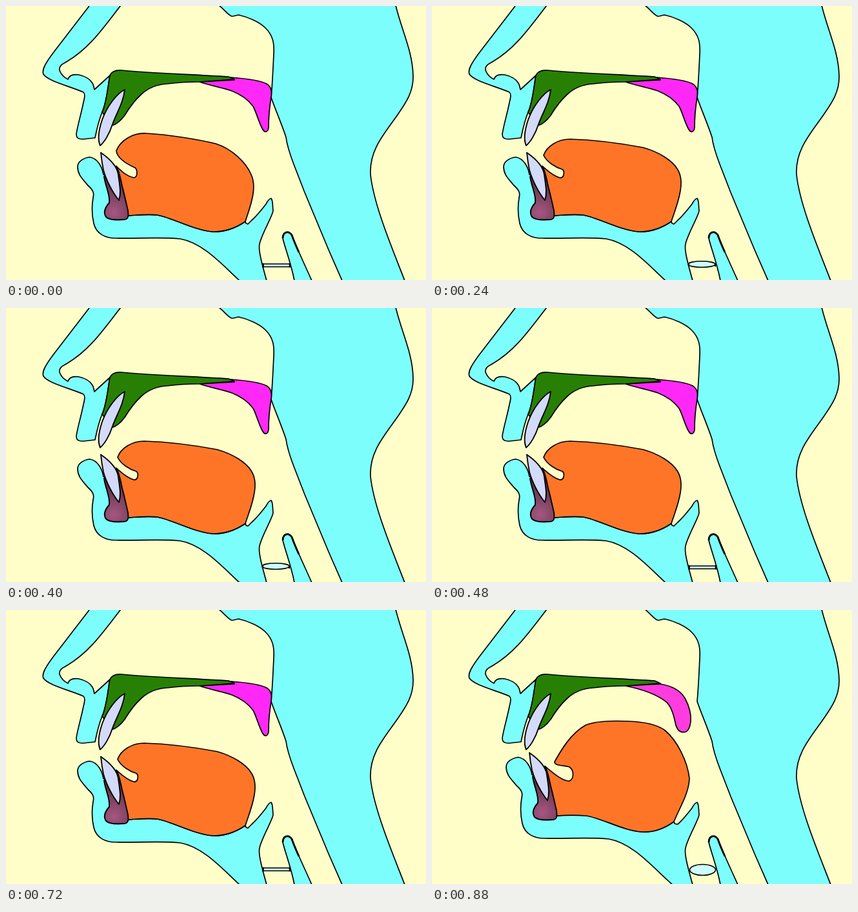
Recreate the animation shown at these times as an HTML page with a canvas. Size 651 px wide and 426 px high, loop 1040 ms.

```html
<!DOCTYPE html>
<html lang="en">
<head>
<meta charset="utf-8">
<title>Vocal tract</title>
<style>
  html, body { margin: 0; width: 100%; height: 100%; overflow: hidden; background: #fffec9; }
  canvas { display: block; }
</style>
</head>
<body>
<canvas id="stage" width="651" height="426"></canvas>
<script>
const ctx = document.getElementById('stage').getContext('2d');
const LOOP = 1040;
const SKIN = '#7cfffc', TOOTH = '#d3dafa', ORANGE = '#ff7528';

const nose = `M129 0 L73 73 C62 88 55 99 58 106 C65 117 100 125 120 134
  C123 137 122 142 120 150 C116 170 111 185 109 199 C109 206 113 207 120 207
  L138 205 C140 195 143 180 149 165 C156 150 158 125 161 108 L137 130
  C136 126 136 123 134 120 C130 113 122 109 113 107 C106 106 98 107 96 114
  C92 112 86 108 83 100 C82 92 88 90 95 86 C130 65 150 35 178 -1`;

const pharynx = `M330 -1 C338 5 344 14 350 16 C355 16 356 14 361 14
  C375 17 393 25 402 34 C414 46 416 58 415 75 C414 95 413 120 411 142
  C415 155 428 185 434 204 C435 212 438 225 446 246 L463 290 L500 379 L521 427
  L618 427 C600 380 570 310 565 262 C563 225 585 200 605 172
  C618 153 632 135 631 108 C630 70 614 40 604 -1`;

const palate = `M161 108 C164 101 170 99 180 100 C230 105 290 106 345 110
  L354 114 L300 118 C285 118 265 119 250 121 C232 122 220 128 210 137
  C198 148 190 160 184 170 C178 178 172 184 164 186 L149 165
  C156 150 158 125 161 108 Z`;

const upperTooth = `M184 130 C172 136 157 155 149 177 C143 195 142 208 146 217
  C152 212 160 200 165 184 C172 165 182 150 184 130 Z`;

const velum = {
  raised: `M300 118 L354 115 L349 111 C375 113 395 116 404 121 C412 126 412 134 411 142
    C408 160 407 175 407 189 C406 197 401 197 398 192 C392 182 388 165 383 156
    C375 145 365 138 350 132 C335 127 318 124 300 118 Z`,
  low: `M300 118 L354 115 C372 118 385 125 392 137 C399 150 402 162 401 173
    C400 182 397 190 390 190 C382 190 379 184 377 175 C374 160 370 148 362 142
    C350 133 330 124 300 118 Z`
};

const tongue = {
  flat: `M173 232 C178 218 195 207 214 207 C250 208 290 213 327 220
    C352 227 372 240 380 253 C386 262 387 275 385 287 C382 306 375 322 371 335
    C355 346 340 351 322 351 C295 350 260 330 235 325 C220 323 205 325 189 326
    L171 249 C178 255 187 264 198 267 C205 268 206 257 202 254 C192 251 178 243 173 232 Z`,
  mid: `M171 225 C177 210 195 197 217 198 C255 200 300 208 325 214
    C350 222 372 243 380 262 C386 275 384 290 381 302 C378 315 374 325 371 335
    C355 346 340 351 322 351 C295 350 260 330 235 325 C220 323 205 325 189 326
    L171 249 C180 258 188 265 198 267 C204 266 204 257 201 252 C190 247 172 237 171 225 Z`,
  high: `M190 236 C200 218 215 192 238 179 C255 172 285 172 305 173
    C332 174 350 179 361 187 C380 203 396 235 399 262 C398 285 385 305 375 329
    C360 340 345 346 326 345 C295 343 265 324 239 320 C225 319 208 319 193 320
    L175 243 C185 251 200 265 212 266 C220 264 221 250 213 244 C205 241 190 243 190 236 Z`
};

const lowerFace = `M189 326 L175 315 L165 270 L151 262 C149 250 142 237 130 235
  C120 236 111 242 111 250 C111 262 118 268 127 279 C135 286 137 291 135 298
  C133 310 133 325 136 338 C140 355 155 361 170 361 C200 362 240 359 270 362
  C305 368 335 402 361 426 L373 437`;
const epiglottis = `L404 427 C395 395 391 378 393 370 C396 355 414 325 414 318
  C413 310 414 303 411 299 C407 300 404 306 403 308 C396 317 388 327 381 333`;
const mouthFloor = `L375 339 L372 338 L371 335 C355 346 340 351 322 351
  C295 350 260 330 235 325 C220 323 205 325 189 326 Z`;
const jawBone = `M152 265 C154 280 162 295 160 306 C153 314 151 322 155 328
  C160 333 172 333 184 332 C190 331 190 326 189 318 C186 305 184 295 180 280
  C178 270 175 255 171 249 Z`;
const lowerTooth = `M147 228 C160 237 172 248 174 262 C176 278 179 290 175 302
  C165 290 155 270 151 255 C149 245 148 238 147 228 Z`;

const larynx = `M447 427 C442 400 432 375 429 361 C429 352 437 348 443 356
  C450 375 462 400 474 427`;

const shift = (path, dx, dy) =>
  path.replace(/(\d+) (\d+)/g, (_, x, y) => `${+x + dx} ${+y + dy}`);

function shape(path, fill, width = 1.7) {
  const p = new Path2D(path);
  ctx.fillStyle = fill;
  ctx.fill(p);
  ctx.lineWidth = width;
  ctx.stroke(p);
}

function stroke(path, width) {
  ctx.lineWidth = width;
  ctx.stroke(new Path2D(path));
}

function glottis(open, rest) {
  if (!open) {
    shape('M398 401 H440 V405.4 H398 Z', '#c8ecfc', 1.5);
    stroke('M398.5 400 V406.5 M440 400 V406.5', 2.6);
    return;
  }
  const p = new Path2D();
  if (rest) p.ellipse(419.5, 404, 20, 8.5, 0, 0, 7);
  else p.ellipse(418, 401.5, 21, 4.8, 0, 0, 7);
  shape(p, '#cafdfb', 1.6);
  if (!rest) stroke('M398 400 V404 M439 400 V405', 2.2);
}

function jaw(rest, tonguePose) {
  const [dx, dy] = rest ? [4, -6] : [0, 0];
  const move = path => shift(path, dx, dy);
  shape(move(lowerFace) + epiglottis + move(mouthFloor), SKIN);
  shape(tongue[tonguePose], ORANGE);
  const shade = ctx.createRadialGradient(167 + dx, 321 + dy, 2, 167 + dx, 318 + dy, 42);
  shade.addColorStop(0, '#a3557f');
  shade.addColorStop(1, '#5f3548');
  shape(move(jawBone), shade, 1.9);
  shape(move(lowerTooth), TOOTH, 1.9);
}

// Voicing: the glottis flips every 80 ms, with a longer last opening.
function poseAt(t) {
  if (t >= 880) return { rest: true, tongue: 'high', open: true };
  const step = Math.floor(t / 80);
  return {
    rest: false,
    tongue: step === 0 || step === 10 ? 'mid' : 'flat',
    open: step < 8 ? step % 2 === 1 : step === 8
  };
}

function draw(t) {
  const pose = poseAt(t);
  ctx.fillStyle = '#fffec9';
  ctx.fillRect(0, 0, 651, 426);
  ctx.strokeStyle = '#000';
  ctx.lineJoin = 'round';
  shape(nose, SKIN);
  shape(pharynx, SKIN);
  shape(pose.rest ? velum.low : velum.raised, pose.rest ? '#ff3cde' : '#ff28f6');
  shape(palate, '#278003');
  shape(upperTooth, TOOTH, 1.9);
  jaw(pose.rest, pose.tongue);
  shape(larynx, SKIN);
  stroke('M429 361 C429 352 437 348 443 356 C446 365 450 374 454 383', 2.8);
  glottis(pose.open, pose.rest);
}

function tick(now) {
  draw(now % LOOP);
  requestAnimationFrame(tick);
}
draw(0);
requestAnimationFrame(tick);
</script>
</body>
</html>
```
